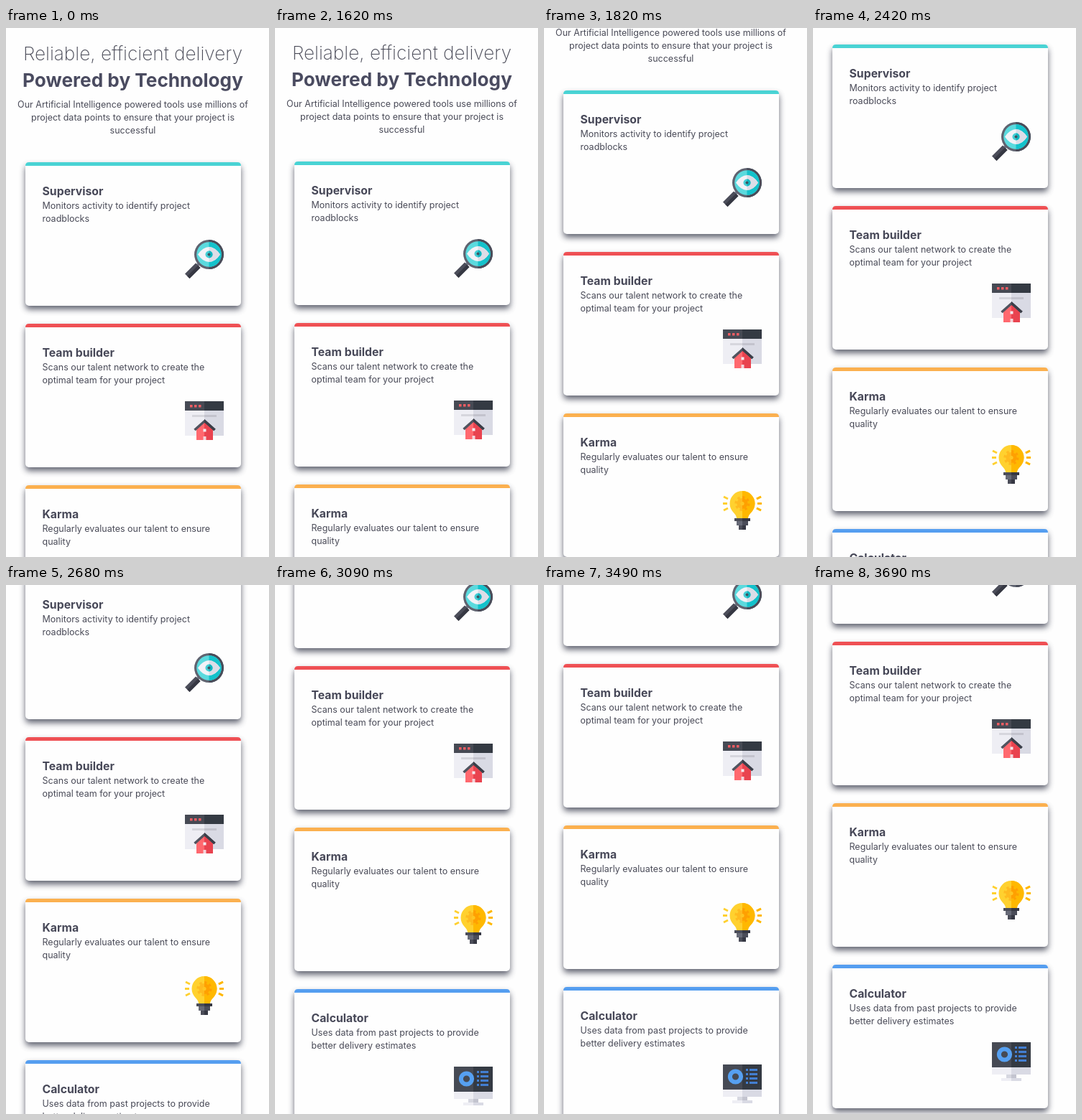
An HTML page that plays this animation: 366x737 px, repeating every 5320 ms.

```html
<!DOCTYPE html>
<html lang="en">
<head>
<meta charset="utf-8">
<title>Powered by Technology</title>
<style>
  html, body { margin: 0; width: 100%; height: 100%; overflow: hidden; background: #fefefe; }
  svg { display: block; }
  text { font: 12.5px Inter, "Open Sans", sans-serif; font-optical-sizing: none; fill: #4a4b58; }
  .center { text-anchor: middle; }
  .thin { font-size: 26.2px; font-weight: 200; }
  .bold { font-size: 26.2px; font-weight: 700; fill: #4a4b60; }
  .title { font-size: 15.8px; font-weight: 700; fill: #474858; }
  .tone { fill: currentColor; }
  .shadow { fill: #3c3f50; opacity: .8; filter: blur(4.2px); }
</style>
</head>
<body>
<svg width="366" height="737" viewBox="0 0 366 737">
  <defs>
    <clipPath id="half"><rect x="27" y="-5" width="40" height="70"/></clipPath>
    <clipPath id="lensHalf"><rect x="33.5" y="-5" width="40" height="70"/></clipPath>
  </defs>
  <g id="page"></g>
</svg>
<script>
const LOOP = 5320;
// [start time, scroll offset]
const SCROLL = [
  [0, 0], [1620, 1], [1820, 100], [2420, 164], [2680, 200],
  [3090, 299], [3290, 300], [3490, 302], [3690, 333]
];
const CARD_TOP = 187, CARD_STEP = 225;

const rect = (x, y, w, h, extra = '') =>
  `<rect x="${x}" y="${y}" width="${w}" height="${h}" ${extra}/>`;
const circle = (x, y, r, extra = '') =>
  `<circle cx="${x}" cy="${y}" r="${r}" ${extra}/>`;
const path = (d, extra = '') => `<path d="${d}" ${extra}/>`;
const text = (x, y, cls, s) => `<text x="${x}" y="${y}" class="${cls}">${s}</text>`;

// Draws a shape in one colour, then its right half in another.
const twoTone = (shape, left, right, clip = 'half') =>
  `<g class="tone" color="${left}">${shape}</g>` +
  `<g class="tone" color="${right}" clip-path="url(#${clip})">${shape}</g>`;

function magnifier() {
  const lens = (shape, left, right) => twoTone(shape, left, right, 'lensHalf');
  return path('M15 35L21 29L24 32L18 38Z', 'fill="#757987"') +
    path('M0 47.5L15 32.5L21.5 39L6.5 54Z', 'fill="#4b4d59"') +
    path('M3.2 50.8L18.2 35.8L21.5 39L6.5 54Z', 'fill="#363843"') +
    lens(circle(33.5, 20.5, 20.5), '#5f6370', '#494c59') +
    lens(circle(33.5, 20.5, 17.3), '#5bdade', '#14c2cb') +
    lens(path('M18 20.5Q25 10 33.5 10T49 20.5Q42 31 33.5 31T18 20.5Z'), '#f2f2f7', '#dcdde7') +
    lens(circle(33.5, 20.5, 5), '#45ced5', '#10b6c0') +
    circle(33.5, 20.5, 2, 'fill="#3e5561"');
}

function houseWindow() {
  const dots = [7, 13, 19].map(x => rect(x, 5, 3.5, 3.5, 'fill="#f25d63"')).join('');
  return twoTone(rect(0, 0, 54, 48), '#eeeef4', '#d9dae4') +
    twoTone(rect(0, 0, 54, 13), '#464a54', '#343a43') + dots +
    twoTone(rect(10, 19, 34, 3), '#d6d6dd', '#c3c3cd') +
    twoTone(path('M16 54V38L27.5 28L39 38V54Z'), '#ff686e', '#e9434f') +
    twoTone(path('M13.5 40L27.5 27.5L41.5 40',
      'fill="none" stroke="currentColor" stroke-width="3.5"'), '#50545f', '#3b3f49') +
    rect(25.5, 38.5, 4, 4, 'fill="#f4e9ee"') +
    rect(25.5, 49, 4, 5, 'fill="#f4d5db"');
}

function bulb() {
  const rays = path('M1 8L7 11M0 17.5H6M1 27L7 24M53 8L47 11M54 17.5H48M53 27L47 24',
    'fill="none" stroke="currentColor" stroke-width="2.8"');
  const gear = circle(27, 17.5, 7.6) + circle(27, 17.5, 8.6,
    'fill="none" stroke="currentColor" stroke-width="4" pathLength="16" stroke-dasharray="1"');
  const glass = path('M19 38C19 31 9.5 29 9.5 17.5A17.5 17.5 0 0 1 44.5 17.5C44.5 29 35 31 35 38Z');
  return twoTone(rays, '#ffd02f', '#ffb600') +
    twoTone(glass, '#ffd12f', '#ffb800') +
    twoTone(gear, '#ffba1f', '#ffa000') +
    circle(27, 17.5, 2.6, 'fill="#ffc522"') +
    twoTone(rect(16, 38, 22, 4), '#4b4d59', '#363843') +
    twoTone(rect(19, 42, 16, 6), '#676a77', '#4b4d59') +
    twoTone(rect(22, 48, 10, 6), '#4b4d59', '#363843');
}

function monitor() {
  const rows = [6, 12, 18, 24].map(y => rect(32, y, 3, 3) + rect(37, y, 11, 3)).join('');
  return twoTone(rect(20, 44, 14, 7), '#d6d7e0', '#c3c4cf') +
    twoTone(rect(13, 50, 28, 4), '#eeeef4', '#d9dae4') +
    twoTone(rect(0, 34, 54, 11), '#eeeef4', '#d9dae4') +
    twoTone(rect(0, 0, 54, 35), '#464a54', '#343a43') +
    circle(17.5, 17, 7.6, 'fill="none" stroke="#56a0f1" stroke-width="6"') +
    `<g fill="#437fd2">${rows}</g>`;
}

const CARDS = [
  ['#49d3d4', 'Supervisor', ['Monitors activity to identify project', 'roadblocks'], magnifier],
  ['#ef5054', 'Team builder', ['Scans our talent network to create the', 'optimal team for your project'], houseWindow],
  ['#fbb04f', 'Karma', ['Regularly evaluates our talent to ensure', 'quality'], bulb],
  ['#559ef0', 'Calculator', ['Uses data from past projects to provide', 'better delivery estimates'], monitor]
];

const card = ([color, title, lines, icon], i) =>
  `<g transform="translate(27 ${CARD_TOP + i * CARD_STEP})">` +
  rect(0, 5, 300, 200, 'rx="5" class="shadow"') +
  rect(0, 0, 300, 200, 'rx="5" fill="#fefefe"') +
  path('M0 5Q0 0 5 0H295Q300 0 300 5Z', `fill="${color}"`) +
  text(23.5, 46, 'title', title) +
  lines.map((s, n) => text(23.5, 65 + n * 18, '', s)).join('') +
  `<g transform="translate(222 108)">${icon()}</g></g>`;

const intro = [
  'Our Artificial Intelligence powered tools use millions of',
  'project data points to ensure that your project is',
  'successful'
];

const page = document.getElementById('page');
page.innerHTML =
  text(176.5, 45, 'center thin', 'Reliable, efficient delivery') +
  text(176.5, 82, 'center bold', 'Powered by Technology') +
  intro.map((s, n) => text(176.5, 111 + n * 18, 'center', s)).join('') +
  CARDS.map(card).join('');

function render(time) {
  const [, offset] = SCROLL.findLast(([start]) => time >= start);
  page.setAttribute('transform', `translate(0 ${-offset})`);
}

const began = performance.now();
function tick() {
  render(Math.max(0, performance.now() - began) % LOOP);
  requestAnimationFrame(tick);
}
tick();
</script>
</body>
</html>
```
